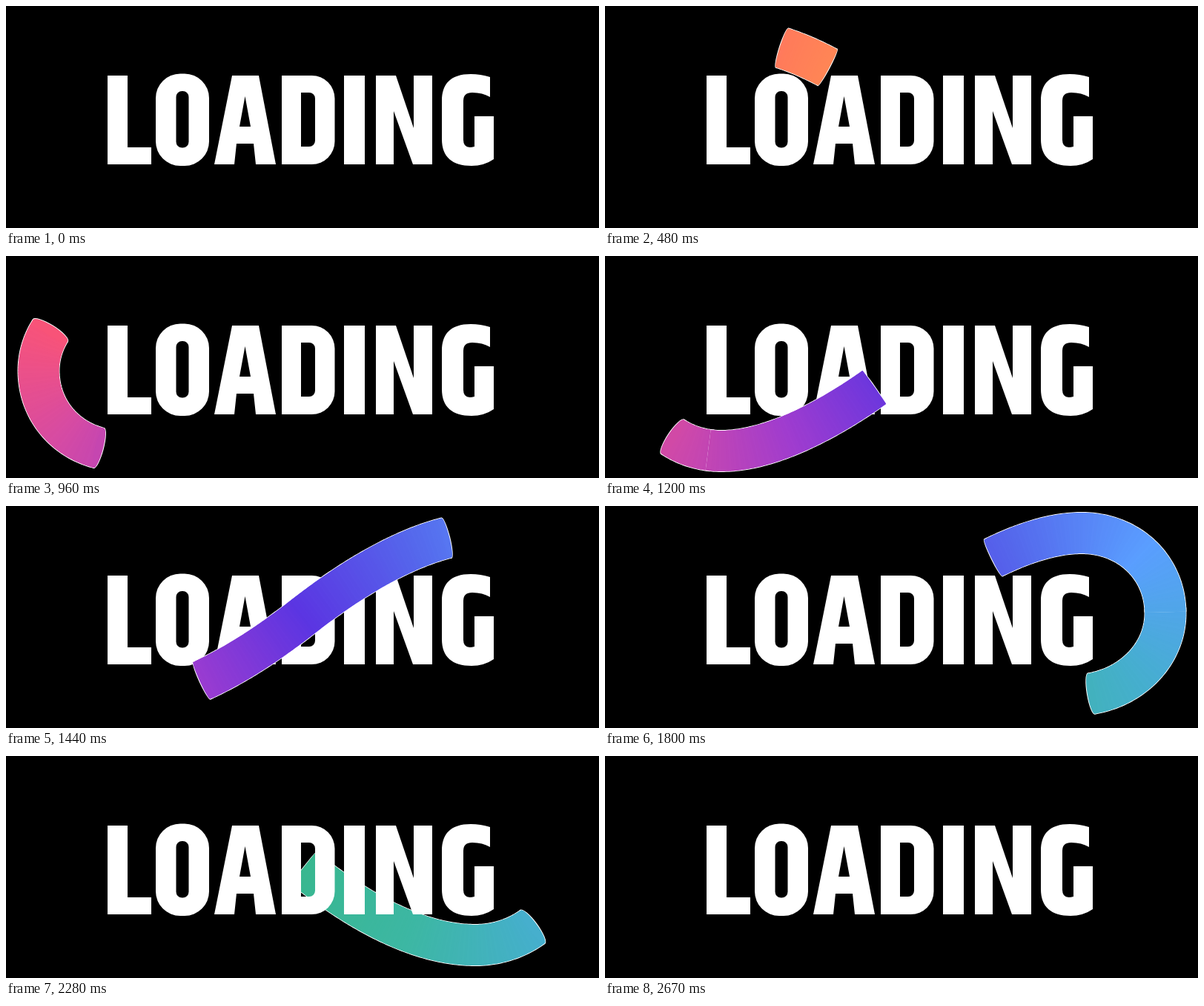
These frames come from a looping animation (800 px wide and 300 px high, 2.73 s). An HTML page with a canvas:

```html
<!DOCTYPE html>
<html lang="en">
<head>
<meta charset="utf-8">
<title>Loading</title>
<style>
  html, body { margin: 0; height: 100%; overflow: hidden; background: #000; }
  canvas { display: block; }
</style>
</head>
<body>
<canvas id="stage" width="800" height="300" role="img" aria-label="LOADING"></canvas>
<script>
const LOOP = 2730, FRAME = 30, KEY_GAP = 480, TOTAL = 1780, WIDTH = 55, FRINGE = 2, STEP = 3;
const ctx = document.getElementById('stage').getContext('2d');

const letters = new Path2D(`
  M137 94H164V191H196V214H137Z
  M305 94H341L364 214H337L334 186H311L308 214H281ZM322.5 122L315 163H330Z
  M456 94H484V214H456Z
  M499 94H526L550 165V94H575V214H549L523 142V214H499Z
  M653 96Q640 92 627 92C600 92 588 105 588 128V180C588 204 602 216 628 216Q645 216 658 207V149H632V190
  Q617 194 617 181V128Q617 117 629 117Q643 117 653 123Z`);
letters.roundRect(202, 91.5, 72, 124.5, 33);
letters.roundRect(229.5, 115, 17, 76.5, 8);
letters.roundRect(372, 94, 71.5, 120, [0, 31, 31, 0]);
letters.roundRect(398, 117, 19, 73, [0, 8, 8, 0]);

// Left lobe as cubic control points; the right lobe is the same curve turned by 180 degrees.
const lobe = [[400, 150], [320, 86], [240, 44.5], [167, 44.5], [99, 44.5], [44, 94], [44, 155],
  [44, 217], [93, 263.5], [157, 263.5], [235, 263.5], [330, 205], [400, 150]];
const turned = lobe.map(([x, y]) => [800 - x, 300 - y]).reverse();
const curve = document.createElementNS('http://www.w3.org/2000/svg', 'path');
curve.setAttribute('d', `M${lobe[0]}C${lobe.slice(1).join(' ')} ${turned.slice(1).join(' ')}`);
const scale = curve.getTotalLength() / TOTAL;
const pointAt = s => curve.getPointAtLength(s * scale);

// Evenly spaced colours along the curve, read from a one-pixel-high gradient.
const colors = ['#ff984c', '#ff7c5a', '#ff5570', '#d64ba3', '#9f3ccf', '#5b35e2',
  '#5568ec', '#5a9eff', '#46aed0', '#3db7a4', '#38b78f'];
const strip = new OffscreenCanvas(TOTAL, 1).getContext('2d');
const ramp = strip.createLinearGradient(0, 0, TOTAL, 0);
colors.forEach((color, i) => ramp.addColorStop(i / (colors.length - 1), color));
strip.fillStyle = ramp;
strip.fillRect(0, 0, TOTAL, 1);
const pixels = strip.getImageData(0, 0, TOTAL, 1).data;
function colorAt(s) {
  const i = 4 * Math.min(Math.floor(s), TOTAL - 1);
  return `rgb(${pixels.slice(i, i + 3).join()})`;
}

// Distance of both ribbon ends along the curve, one key every KEY_GAP ms.
const head = [0, 187, 586, 1113, 1598, 1810, 1810];
const tail = [0, 120, 386, 729, 1141, 1538, 1960];

function spline(keys, t) {
  const i = Math.floor(t / KEY_GAP), u = t / KEY_GAP - i, v = 1 - u;
  const key = k => keys[Math.min(Math.abs(k), keys.length - 1)];
  const slope = k => (key(k + 1) - key(k - 1)) / 2;
  const s = v * v * ((1 + 2 * u) * key(i) + u * slope(i))
    + u * u * ((3 - 2 * u) * key(i + 1) - v * slope(i + 1));
  return Math.min(s, TOTAL);
}

function line(from, to, step, color, width) {
  ctx.beginPath();
  for (let s = from; s < to; s += step) ctx.lineTo(...xy(s));
  ctx.lineTo(...xy(to));
  ctx.strokeStyle = color;
  ctx.lineWidth = width;
  ctx.stroke();
}

function xy(s) {
  const { x, y } = pointAt(s);
  return [x, y];
}

// Ends bulge more the further out they are.
function cap(s, color, width) {
  const [x, y] = xy(s), a = pointAt(s - 1), b = pointAt(s + 1);
  const bulge = Math.abs(x - 400) / 50 + (width - WIDTH) / 2;
  ctx.beginPath();
  ctx.ellipse(x, y, bulge, width / 2, Math.atan2(b.y - a.y, b.x - a.x), 0, 7);
  ctx.fillStyle = color;
  ctx.fill();
}

function ribbon(start, end, low, high) {
  const from = Math.max(start, low), to = Math.min(end, high);
  if (from >= to) return;
  const ends = [from, to].filter(s => s === start || s === end);
  line(from, to, STEP, '#fff', WIDTH + FRINGE);
  ends.forEach(s => cap(s, '#fff', WIDTH + FRINGE));
  for (let s = from; s < to; s += STEP) line(s, Math.min(s + 2 * STEP, to), STEP, colorAt(s), WIDTH);
  ends.forEach(s => cap(s, colorAt(s), WIDTH));
}

function draw(now) {
  const t = Math.floor(now % LOOP / FRAME) * FRAME;
  const start = spline(tail, t), end = t < LOOP - 2 * FRAME ? spline(head, t) : 0;
  ctx.clearRect(0, 0, 800, 300);
  ribbon(start, end, 0, 605);
  ribbon(start, end, 1330, TOTAL);
  ctx.fillStyle = '#fff';
  ctx.fill(letters, 'evenodd');
  ribbon(start, end, 600, 1335);
}

const begin = performance.now();
(function tick() {
  draw(performance.now() - begin);
  requestAnimationFrame(tick);
})();
</script>
</body>
</html>
```
